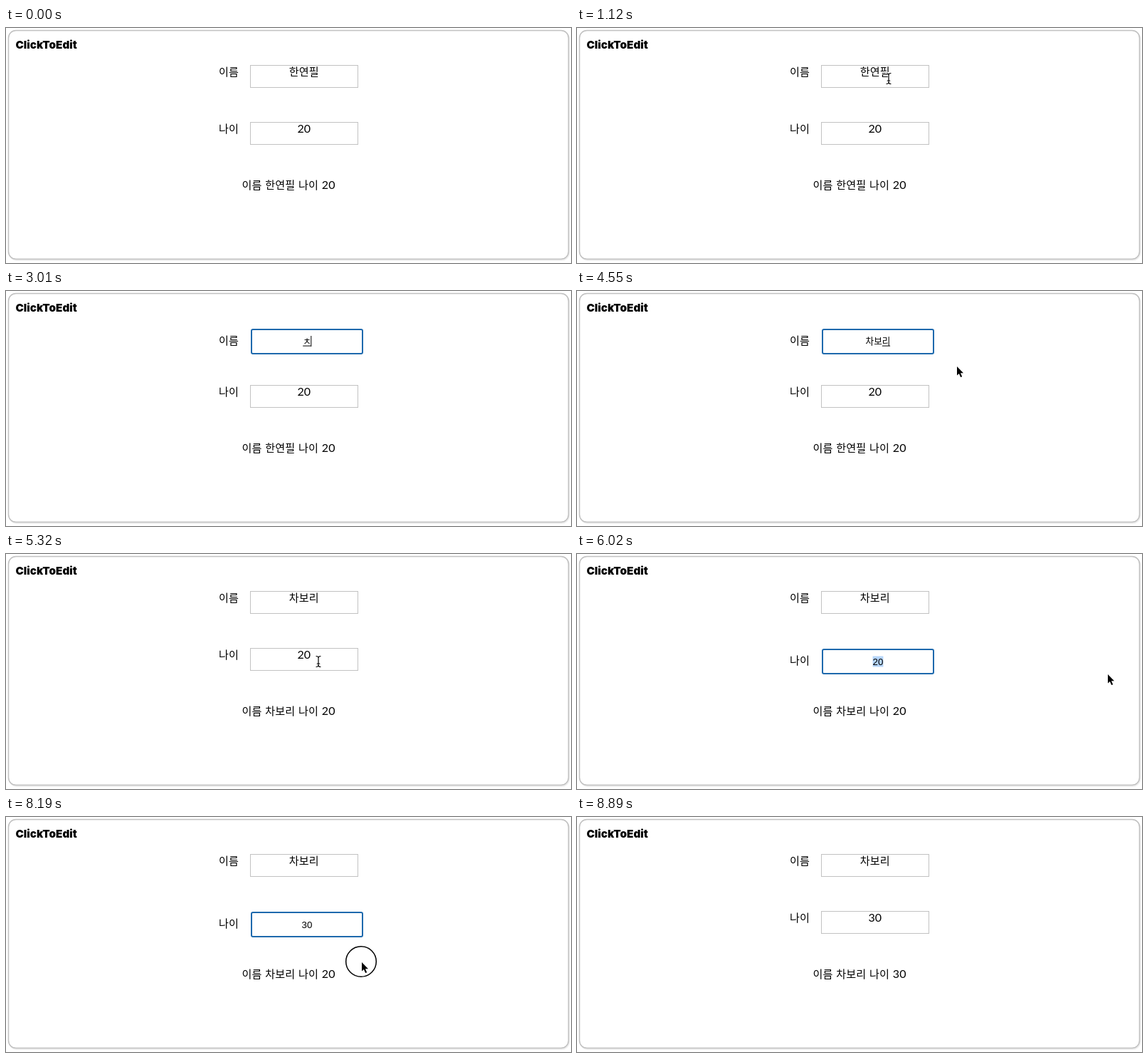
Recreate the animation shown at these times as an HTML page. Size 794 px wide and 330 px high, loop 9100 ms.

```html
<!DOCTYPE html>
<html lang="ko">
<head>
<meta charset="utf-8">
<title>ClickToEdit</title>
<style>
  html, body { margin: 0; width: 100%; height: 100%; overflow: hidden; background: #fff; }
  svg { display: block; width: 794px; height: 330px; }
  text { font: 15.1px "Noto Sans CJK KR", "Noto Sans CJK", sans-serif; word-spacing: .8px; white-space: pre; }
  .num { font: 16px Lato, "Noto Sans", sans-serif; }
  .mid { text-anchor: middle; }
  .typed { font-size: 12.6px; }
  .typed.num { font: 13.33px "Liberation Sans", Arial, sans-serif; }
  .title { font: 900 15.2px Inter, sans-serif; }
  .box { fill: #fff; stroke: #c2c2c2; }
  .focus { fill: #fff; stroke: #1e69ad; stroke-width: 2; }
</style>
</head>
<body>
<svg viewBox="0 0 794 330">
  <rect x="4.5" y="4.5" width="787" height="321.5" rx="11" fill="none" stroke="#eee" stroke-width="2"/>
  <rect x="3.5" y="3.5" width="787" height="321" rx="10.5" fill="#fff" stroke="#c0c0c0" stroke-width="1.5"/>
  <text class="title" x="13.5" y="28.5">ClickToEdit</text>
  <g id="fields"></g>
  <text class="mid" x="397" y="225.5"><tspan id="summary"></tspan><tspan id="age" class="num"></tspan></text>
  <g id="pointer">
    <circle id="ring" cx="-1" cy="-1" r="21.3" fill="none" stroke="#000" stroke-width="1.5"/>
    <path id="arrow" d="M0 0V12.6L2.9 10 5.1 15.1 7.2 14.2 5 9.2H9Z" stroke="#fff" stroke-width="1" paint-order="stroke"/>
    <g id="beam" fill="none" stroke-linecap="round">
      <path d="M-3-7.5Q0-7.5 0-5Q0-7.5 3-7.5M0-5V5M-3 7.5Q0 7.5 0 5Q0 7.5 3 7.5M-1.8 3H1.8" stroke="#fff" stroke-width="2.6"/>
      <path d="M-3-7.5Q0-7.5 0-5Q0-7.5 3-7.5M0-5V5M-3 7.5Q0 7.5 0 5Q0 7.5 3 7.5M-1.8 3H1.8" stroke="#000" stroke-width="1.2"/>
    </g>
  </g>
</svg>
<script>
const LOOP = 9100, STEP = 70;
const OLD_NAME = '한연필', NEW_NAME = '차보리';
const $ = id => document.getElementById(id);
const within = (t, spans) => spans.some(([a, b]) => t >= a && t < b);
const show = (el, on) => el.setAttribute('visibility', on ? 'inherit' : 'hidden');

// Last value whose start time has passed.
const at = (t, steps) => steps.reduce((value, [start, next]) => t >= start ? next : value, '');

const typedName = [[0, OLD_NAME], [3010, 'ㅊ'], [3430, '차'], [3570, '찹'],
  [3710, '차보'], [3780, '차볼'], [3920, NEW_NAME]];
const typedAge = [[0, '20'], [7140, '3'], [7350, '30']];
const nameEdit = [[1750, 4690]], ageEdit = [[5530, 8260]];
const pointerOn = [[70, 3010], [4270, 7140], [7840, 8890]];
const pressed = [[1610, 1750], [4620, 4690], [5390, 5530], [8120, 8260]];

// time, x, y
const route = [
  [70, 585, 30], [280, 550, 20], [420, 550, 20], [490, 545, 8], [910, 438, 71],
  [1890, 438, 71], [2170, 680, 114], [3010, 680, 114],
  [4270, 649, 108], [4550, 534, 106], [4690, 534, 106], [4970, 400, 140],
  [5040, 400, 140], [5250, 439, 151], [5530, 439, 151], [6020, 746, 169],
  [7140, 746, 169], [7840, 700, 177], [8050, 500, 204], [8540, 500, 204], [8890, 400, 334]
];

function position(t) {
  const i = route.findIndex(k => k[0] > t);
  if (i < 1) return route[i < 0 ? route.length - 1 : 0].slice(1);
  const [t0, x0, y0] = route[i - 1], [t1, x1, y1] = route[i];
  const u = (t - t0) / (t1 - t0), e = u * u * (3 - 2 * u);
  return [x0 + (x1 - x0) * e, y0 + (y1 - y0) * e];
}

function makeField(label, top, kind) {
  const g = document.createElementNS('http://www.w3.org/2000/svg', 'g');
  g.setAttribute('transform', `translate(0 ${top})`);
  g.innerHTML = `
    <text class="label" x="299">${label}</text>
    <g class="view">
      <rect class="box" x="343.5" y=".5" width="151" height="31"/>
      <text class="value mid ${kind}" x="418.7" y="15"></text>
    </g>
    <g class="edit">
      <rect class="focus" x="345" y="2" width="156" height="34" rx="2"/>
      <rect class="selection" y="11.5" height="15" fill="#b5d5fb"/>
      <text class="input typed mid ${kind}" x="423" y="${kind ? 24 : 23}"></text>
      <rect class="line" y="24.6" height="1" width="11.3"/>
      <rect class="caret" y="11" height="15" width="1"/>
    </g>`;
  $('fields').append(g);
  const part = name => g.querySelector('.' + name);
  const charWidth = kind ? 7.41 : 11.6;
  return (editing, value, typed, selected, composing, caret) => {
    part('label').setAttribute('y', editing ? 23 : 15);
    show(part('view'), !editing);
    show(part('edit'), editing);
    part('value').textContent = value;
    part('input').textContent = typed;
    const width = typed.length * charWidth, right = 423 + width / 2;
    part('selection').setAttribute('x', right - width);
    part('selection').setAttribute('width', width);
    part('line').setAttribute('x', right - charWidth);
    part('caret').setAttribute('x', right - .5);
    show(part('selection'), editing && selected);
    show(part('line'), editing && composing);
    show(part('caret'), editing && caret);
  };
}

const nameField = makeField('이름', 52, '');
const ageField = makeField('나이', 132, 'num');

function draw(time) {
  const t = Math.floor(time % LOOP / STEP) * STEP;
  const name = t < 4690 ? OLD_NAME : NEW_NAME;
  const age = t < 8260 ? '20' : '30';
  nameField(within(t, nameEdit), name, at(t, typedName), t < 3010, t >= 3010, within(t, [[3010, 3430]]));
  ageField(within(t, ageEdit), age, at(t, typedAge), t < 7140, false, false);
  $('summary').textContent = `이름 ${name} 나이 `;
  $('age').textContent = age;

  const [x, y] = position(t);
  const overField = x > 343 && x < 502 && (y > 52 && y < 89 || y > 132 && y < 169);
  $('pointer').setAttribute('transform', `translate(${x.toFixed(1)} ${y.toFixed(1)})`);
  show($('pointer'), within(t, pointerOn));
  show($('ring'), within(t, pressed));
  show($('beam'), overField);
  show($('arrow'), !overField);
}

const start = performance.now();
function tick() {
  draw(performance.now() - start);
  requestAnimationFrame(tick);
}
tick();
</script>
</body>
</html>
```
